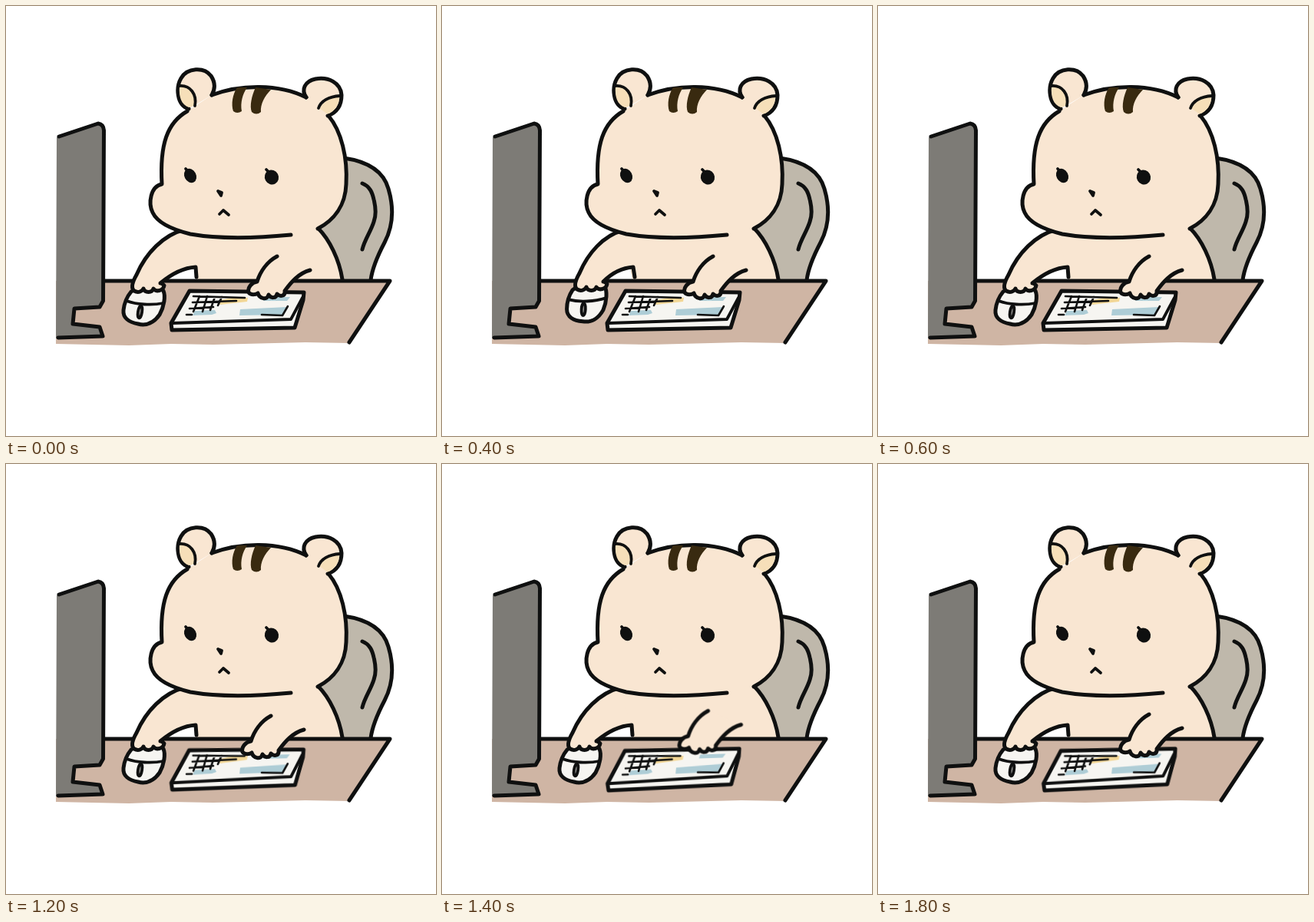
Recreate the animation shown at these times as an HTML page without scripts. Size 560 by 560 pixels, loop 2 s.

```html
<!DOCTYPE html>
<html lang="en">
<head>
<meta charset="utf-8">
<title>Desk work</title>
<style>
html, body { margin: 0; width: 100%; height: 100%; overflow: hidden; background: #fff; }
svg { display: block; width: 100vw; height: 100vh; }
.ink { stroke: #0f1010; stroke-width: 5; stroke-linecap: round; stroke-linejoin: round; fill: none; }
.thin { stroke-width: 2.6; }
.mid { stroke-width: 3.8; }
.fur { fill: #f9e6d2; }
.plain { stroke: none; }
.inner { fill: #f6dfb9; stroke: none; }
.white { fill: #f6f5f1; }
.blue { fill: #aecdd6; stroke: none; }
.dark { fill: #0f1010; stroke: none; }

.rest, .pull, .push, .hand, .keys { animation: 2s step-end infinite; }
.rest { animation-name: rest; }
.pull { animation-name: pull; visibility: hidden; }
.push { animation-name: push; visibility: hidden; }
.hand { animation-name: hand; }
.keys { animation-name: keys; transform-origin: 302px 397px; }

@keyframes rest {
  0%, 30%, 100% { visibility: visible; }
  10% { visibility: hidden; }
}
@keyframes pull {
  0%, 20%, 100% { visibility: hidden; }
  10% { visibility: visible; }
}
@keyframes push {
  0%, 30%, 100% { visibility: hidden; }
  20% { visibility: visible; }
}
@keyframes hand {
  0%, 90%, 100% { transform: none; }
  50%, 70% { transform: translate(-6.5px, -4.5px); }
  60%, 80% { transform: translate(-8px, 2px); }
}
@keyframes keys {
  0%, 100% { transform: none; }
  60%, 80% { transform: translateY(.5px) rotate(-1.1deg); }
  70%, 90% { transform: translateY(.5px) rotate(-1.8deg); }
}
</style>
</head>
<body>
<svg viewBox="0 0 560 560" class="ink">
  <defs>
    <g id="mouse">
      <path class="white" d="M163 372C175 364 198 364 205 371C208 378 206 391 200 402C193 412 183 417 172 414C160 412 152 406 153 396C154 387 158 378 163 372Z"/>
      <path class="mid" d="M157 384C170 389 190 390 205 387"/>
      <ellipse class="mid" cx="174.5" cy="398.5" rx="2.6" ry="8" transform="rotate(9 174.5 398.5)" fill="#a9a8a4"/>
    </g>
  </defs>

  <!-- chair -->
  <path class="plain" fill="#bfb8ab" d="M400 198H440C468 202 491 213 498 238C506 265 504 287 493 308C483 327 477 341 475 357H400Z"/>
  <path d="M440 198C468 202 491 213 498 238C506 265 504 287 493 308C483 327 477 341 475 357"/>
  <path d="M464 231C474 235 477 243 479 252C482 264 482 273 479 281C475 294 467 304 464 317"/>

  <!-- body -->
  <path class="fur plain" d="M225 290L244 338L248 357H438C434 330 421 304 407 290L330 270Z"/>
  <path d="M407 290C421 304 434 330 438 356"/>

  <!-- desk -->
  <path class="plain" fill="#cfb5a4" d="M65 358H500L447 439L390 438L270 441L215 440L160 442L65 440Z"/>
  <path d="M129 358H500L447 438"/>

  <!-- keyboard -->
  <g class="keys">
    <path class="white" d="M239 371L388 373L387 383L376 419L216 422L215 413Z"/>
    <path class="plain" fill="#f3d796" d="M279 383L300 379L315 380L314 385L278 389Z"/>
    <path class="blue" d="M246 397L272 396L274 400L268 402L243 403ZM305 395L366 392L361 402L304 403ZM337 379L370 379L366 384L335 384Z"/>
    <path class="mid" d="M217 413L371 408L386 380"/>
    <path class="thin" d="M244 378L311 380M243 386L300 384M239 394L270 392M252 378L244 398M262 378L256 398M272 379L266 396M281 379L276 390M235 402H242M333 402L360 403L367 391"/>
  </g>

  <!-- right arm -->
  <g class="hand">
    <path class="fur" d="M353 326C340 333 331 346 327 359C320 360 314 367 316 373C319 377 325 376 328 374C330 381 340 384 342 376C345 381 352 381 353 375C357 379 364 378 363 371C371 360 381 348 396 344"/>
  </g>

  <!-- left arm -->
  <g class="rest">
    <use href="#mouse"/>
    <path class="fur" d="M233 291C205 298 182 322 170 350C166 357 162 367 167 371C172 374 177 372 179 368C181 374 190 374 192 368C195 373 205 371 206 364C204 362 202 361 201 361C213 351 230 341 247 340L248 353"/>
  </g>
  <g class="pull">
    <use href="#mouse" transform="translate(-14 -8) rotate(14 180 392)"/>
    <path class="fur" d="M230 291C204 297 179 322 165 345C159 350 153 361 158 367C162 370 166 370 168 366C168 373 178 375 180 370C184 375 190 371 187 365C197 354 222 345 245 342L248 353"/>
  </g>
  <g class="push">
    <use href="#mouse" transform="translate(9 -4) rotate(-6 180 392)"/>
    <path class="fur" d="M236 292C210 299 190 322 179 348C175 355 171 365 176 369C181 372 186 370 188 366C190 372 199 372 201 366C204 371 214 369 215 362C213 360 211 359 210 359C220 349 234 341 249 340L251 353"/>
  </g>

  <!-- monitor -->
  <path class="plain" fill="#7d7b76" d="M66 171L121 153L128 159L127 384L122 393L88 395L87 414L123 418L126 430L65 433Z"/>
  <path d="M69 170L120 153Q127 154 127.5 162L126.5 384L122 392L89 394L87 414L122 418L126 430L68 432"/>

  <!-- head -->
  <path class="fur plain" d="M236 137C210 152 200 180 203 232C188 235 185 257 191 269C198 284 220 292 240 297C280 304 330 302 371 298L406 290C427 279 442 260 443 232C445 198 437 163 420 142L391 118C355 101 305 102 268 116Z"/>
  <path class="fur" d="M238 134C222 129 221 106 228 94C236 80 258 79 267 91C273 100 272 109 268 116"/>
  <path class="inner" d="M226 105C240 104 247 116 245 130L238 132C228 128 225 118 226 105Z"/>
  <path class="mid" d="M226 104C240 103 249 115 246 130"/>
  <path class="fur" d="M391 119C384 109 389 98 403 95C420 92 436 100 437 116C437 130 430 139 419 143"/>
  <path class="inner" d="M408 133C411 125 421 119 434 118C434 129 428 137 419 141Z"/>
  <path class="mid" d="M407 133C410 124 420 118 435 117"/>
  <path d="M268 116C305 102 355 101 391 119M236 137C210 152 200 180 203 232C188 235 185 257 191 269C198 284 220 292 240 297C280 304 330 302 371 298M420 143C437 163 445 198 443 232C442 260 427 279 406 290"/>
  <path class="plain" fill="#392a10" d="M301 106C295 115 293 128 296 137Q301 141 307 137C305 126 308 115 314 106ZM325 106C320 117 317 130 320 138Q326 143 332 138C331 128 337 117 345 109Z"/>

  <!-- face -->
  <ellipse class="dark" cx="240" cy="221" rx="7.6" ry="9.6" transform="rotate(-28 240 221)"/>
  <ellipse class="dark" cx="346" cy="223" rx="9" ry="9.6" transform="rotate(-28 346 223)"/>
  <path class="mid" d="M234 212L239 217M339 213L344 218"/>
  <path class="mid" fill="#0f1010" d="M276 241L281 243L280 247Z"/>
  <path class="mid" d="M278 271L283 266L290 272"/>
</svg>
</body>
</html>
```
